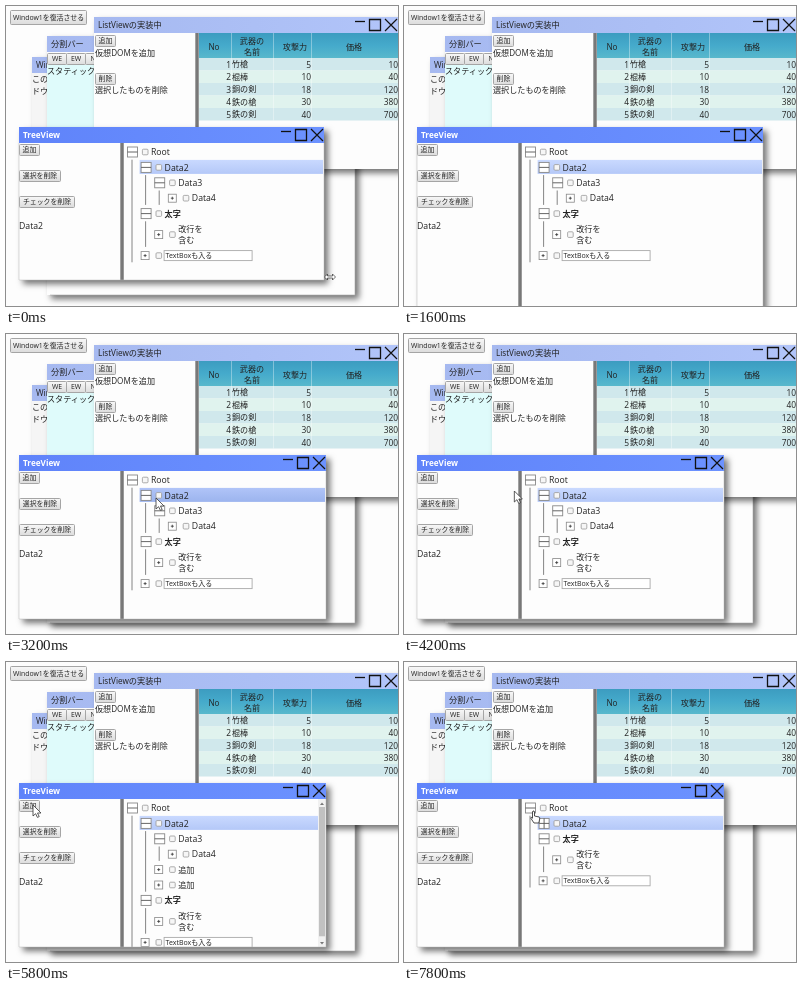
Animation, 392 px wide and 300 px high, one loop 8000 ms. Source, as an HTML page:

```html
<!DOCTYPE html>
<html lang="ja">
<head>
<meta charset="utf-8">
<style>
html, body { margin: 0; width: 100%; height: 100%; overflow: hidden; background: #fdfdfd; }
svg { display: block; width: 392px; height: 300px; }
text { font-family: "Open Sans", "Noto Sans CJK JP", "Noto Sans CJK", sans-serif; fill: #222; }
.win { filter: drop-shadow(4px 4px 3px rgba(0, 0, 0, .55)); }
</style>
</head>
<body>
<svg id="stage" viewBox="0 0 392 300" xmlns="http://www.w3.org/2000/svg">
  <defs>
    <linearGradient id="btn" x2="0" y2="1"><stop stop-color="#f8f8f8"/><stop offset="1" stop-color="#dcdcdc"/></linearGradient>
    <linearGradient id="active"><stop stop-color="#5f83fa"/><stop offset="1" stop-color="#6c92ff"/></linearGradient>
    <linearGradient id="idle"><stop stop-color="#a6b9f0"/><stop offset="1" stop-color="#b2c5fa"/></linearGradient>
    <linearGradient id="head" x2="0" y2="1"><stop stop-color="#3c9cc0"/><stop offset=".5" stop-color="#45aacb"/><stop offset="1" stop-color="#58b8cc"/></linearGradient>
    <linearGradient id="split"><stop stop-color="#b5b5b5"/><stop offset=".5" stop-color="#666"/><stop offset="1" stop-color="#aaa"/></linearGradient>
    <linearGradient id="sel" x2="0" y2="1"><stop stop-color="#c9d9ff"/><stop offset="1" stop-color="#b4c8f8"/></linearGradient>
    <linearGradient id="hover" x2="0" y2="1"><stop stop-color="#b0c4f8"/><stop offset="1" stop-color="#9cb4ee"/></linearGradient>
    <clipPath id="clip"><rect id="clipBox" x="13" y="121"/></clipPath>
  </defs>
  <g id="back"></g>
  <g id="front"></g>
  <g id="pointer"></g>
</svg>
<script>
const $ = id => document.getElementById(id);
const LOOP = 8000, STEP = 200, ROW = 15.4;
const LEFT = 13, TOP = 121;

const rect = (x, y, w, h, fill, more = '') =>
  `<rect x="${x}" y="${y}" width="${w}" height="${h}" fill="${fill}" ${more}/>`;
const path = (d, stroke = '#555', width = 1, fill = 'none') =>
  `<path d="${d}" stroke="${stroke}" stroke-width="${width}" fill="${fill}"/>`;
// y is the middle of the line
const text = (x, y, s, size = 8.1, more = '') =>
  `<text x="${x}" y="${y + size * .36}" font-size="${size}" ${more}>${s}</text>`;
const end = 'text-anchor="end"', mid = 'text-anchor="middle"';
const button = (x, y, w, s, h = 12) =>
  rect(x + .5, y + .5, w - 1, h - 1, 'url(#btn)', 'stroke="#a5a5a5" rx="1"') +
  text(x + w / 2, y + h / 2, s, 6.9, mid);

function frame(x, y, w, h, title, on) {
  return rect(x, y, w, h, '#fdfdfd', 'class="win"') +
    rect(x, y, w, 16, on ? 'url(#active)' : 'url(#idle)') +
    text(x + 4, y + 8.5, title, 8.2, on ? 'style="fill:#fff" font-weight="700"' : '');
}

const titleIcons = (r, y) =>
  path(`M${r - 43} ${y + 4.5}h10`, '#111', 1.3) +
  path(`M${r - 28.5} ${y + 2.5}h11v11h-11z`, '#111', 1.3) +
  path(`M${r - 13} ${y + 2}l12 12m0-12l-12 12`, '#111', 1.2);

function listView() {
  let s = frame(88, 11, 320, 152, 'ListViewの実装中') + titleIcons(392, 11);
  s += button(89, 29, 21, '追加') + text(89, 47, '仮想DOMを追加') +
    button(89, 67, 21, '削除') + text(89, 84, '選択したものを削除');
  s += rect(189, 27, 4, 136, 'url(#split)') + rect(193, 27, 200, 25, 'url(#head)');
  s += text(208, 41, 'No', 8.1, mid) + text(246, 35, '武器の', 8.1, mid) + text(246, 46, '名前', 8.1, mid) +
    text(289, 41, '攻撃力', 8.1, mid) + text(348, 41, '価格', 8.1, mid);
  const items = [['竹槍', 5, 10], ['棍棒', 10, 40], ['銅の剣', 18, 120], ['鉄の槍', 30, 380], ['鉄の剣', 40, 700]];
  items.forEach(([name, power, price], i) => {
    const y = 52 + i * 12.5, c = y + 6.5;
    s += rect(193, y, 200, 12.5, i % 2 ? '#e0f3ee' : '#d0e8ec') +
      text(225, c, i + 1, 8.4, end) + text(226, c, name) +
      text(305, c, power, 8.4, end) + text(392, c, price, 8.4, end);
  });
  for (const x of [225.5, 267.5, 305.5]) s += path(`M${x} 27V114.5`, 'rgba(255,255,255,.5)', .7);
  return s;
}

$('back').innerHTML =
  button(4, 4, 77, 'Window1を復活させる', 15) +
  frame(26, 51, 200, 150, 'Window1') + rect(26, 67, 20, 134, '#f5f5f5') +
  text(26, 73, 'このウィン') + text(26, 85, 'ドウは') +
  frame(41, 30, 308, 259, '分割バー') +
  button(41, 47, 20, 'WE') + button(60, 47, 20, 'EW') + button(79, 47, 20, 'NS') +
  rect(41, 59, 60, 205, '#dffbfb') + text(41, 65.5, 'スタティック') +
  path('M349 163V289H44', '#aaa', .6) + listView();

function at(keys, t) {
  let i = 0;
  while (i < keys.length - 1 && keys[i + 1][0] <= t) i++;
  const a = keys[i], b = keys[i + 1] || a;
  const k = b === a ? 0 : (t - a[0]) / (b[0] - a[0]);
  return [1, 2].map(j => a[j] + (b[j] - a[j]) * k);
}

// [time, right, bottom]
const sizes = [[0, 318, 274], [1000, 359, 274], [1200, 359, 274], [1400, 359, 288], [1600, 359, 308],
  [1800, 355, 307], [2400, 320, 285]];
// [time, x, y]
const moves = [[2600, 324, 290], [3200, 150, 164], [3800, 152, 164], [5000, 27, 143], [6000, 27, 143],
  [6200, 40, 146], [6600, 148, 162], [6800, 140, 159], [7400, 140, 159], [7800, 127, 149]];

const leaf = (label, more) => ({ label, ...more });
function model(t) {
  const added = t < 5200 ? 0 : t < 5600 ? 1 : t < 6000 ? 2 : 3;
  const data3 = { label: 'Data3', kids: [leaf('Data4')] };
  return { label: 'Root', kids: [
    { label: 'Data2', selected: true, closed: t >= 7000,
      kids: [data3, ...Array.from({ length: added }, () => leaf('追加'))] },
    { label: '太字', bold: true, kids: [leaf('改行を', { second: '含む' })] },
    leaf('TextBoxも入る', { input: true })
  ] };
}

function nodeIcon(x, y, node) {
  if (!node.kids) {
    return rect(x + .5, y - 4, 8, 8, '#fff', 'stroke="#888" stroke-width=".8"') +
      path(`M${x + 3} ${y}h3m-1.5-1.5v3`, '#333', .8);
  }
  return rect(x + .5, y - 5, 10, 10, '#fff', 'stroke="#888" stroke-width=".9"') +
    path(`M${x + .5} ${y}h10` + (node.closed ? 'm-5-5v10' : ''), '#555', .9);
}

// Draws a node and its open children; returns the markup and the next y
function branch(node, depth, y, right, hover) {
  const x = 121 + depth * 13.6, tall = node.second ? 26.6 : ROW, c = y + tall / 2;
  let s = '';
  if (node.selected) s += rect(x - 1, y + .2, right - x, 14, hover ? 'url(#hover)' : 'url(#sel)');
  s += nodeIcon(x, c, node) +
    rect(x + 15.4, c - 2.8, 5.6, 5.6, '#f6f6f6', 'stroke="#999" stroke-width=".8" rx="1"');
  if (node.input) {
    s += rect(x + 23.5, c - 5, 88, 10, '#fff', 'stroke="#aaa" stroke-width=".9"') + text(x + 25, c, node.label, 7);
  } else if (node.second) {
    s += text(x + 24, c - 5.6, node.label) + text(x + 24, c + 5.6, node.second);
  } else {
    const latin = /^[A-Z]/.test(node.label);
    s += text(x + 24, c, node.label, latin ? 8.7 : 8.1, node.bold ? 'font-weight="700"' : '');
  }
  y += tall;
  if (node.kids && !node.closed) {
    const start = y;
    for (const kid of node.kids) {
      const [part, next] = branch(kid, depth + 1, y, right, hover);
      s += part;
      y = next;
    }
    s += path(`M${x + 5} ${start}V${y - 1}`, '#777', .9);
  }
  return [s, y];
}

function scrollbar(r, b, content) {
  const x = r - 8, h = b - 137, track = h - 16;
  return rect(x, 137, 8, h, '#f1f1f1') +
    rect(x + 1, 145, 6, track * Math.min(1, h / content), '#c1c1c1') +
    path(`M${x + 2} 143l2-2.5l2 2.5z`, 'none', 0, '#777') +
    path(`M${x + 2} ${b - 5}l2 2.5l2-2.5z`, 'none', 0, '#777');
}

const shapes = {
  arrow: path('M0 0V11L2.6 8.7L4.4 12.4L6.2 11.6L4.5 8H8z', '#333', .8, '#fff'),
  hand: path('M2 0Q3.3-.5 3.5 1V5L8 6Q9 6.3 8.7 8L7.8 12H3L0 7.5Q-.6 6.3.8 6.5L1.5 7.2V1z', '#222', .8, '#fff'),
  wide: path('M-5.5 0L-2.5-3V-1H2.5V-3L5.5 0L2.5 3V1H-2.5V3z', '#333', .7, '#fff'),
  corner: path('M-4-4H0L-1.3-2.7L2.7 1.3L4 0V4H0L1.3 2.7L-2.7-1.3L-4 0z', '#333', .7, '#fff')
};

function pointer(t, r, b) {
  if (t < 1400) return [r + 6, b - 3, 'wide'];
  if (t < 2800) return [r + 4, b + 5, 'corner'];
  const [x, y] = at(moves, t);
  return [x, y, t >= 6800 ? 'hand' : 'arrow'];
}

function draw(t) {
  const [r, b] = at(sizes, t), [px, py, shape] = pointer(t, r, b);
  const hover = px > 134 && px < r && py > 154 && py < 169;
  const tree = model(t), first = 138.3;
  let [rows, bottom] = branch(tree, 0, first, r, hover);
  if (bottom > b) rows += scrollbar(r, b, bottom - 137);

  $('clipBox').setAttribute('width', r - LEFT);
  $('clipBox').setAttribute('height', b - TOP);
  $('front').innerHTML = frame(LEFT, TOP, r - LEFT, b - TOP, 'TreeView', true) +
    titleIcons(r, TOP) +
    `<g clip-path="url(#clip)">` +
    button(13, 138, 21, '追加') + button(13, 164, 42, '選択を削除') + button(13, 190, 56, 'チェックを削除') +
    text(13, 220, 'Data2', 8.7) +
    rect(114, 137, 4, b - 137, 'url(#split)') + rows + '</g>' +
    path(`M${LEFT} ${TOP + 16}V${b}H${r}V${TOP + 16}`, '#bbb', .5);
  $('pointer').innerHTML = `<g transform="translate(${px} ${py})">${shapes[shape]}</g>`;
}

let last = -1;
const begin = performance.now();
function tick() {
  const t = Math.floor((performance.now() - begin) % LOOP / STEP) * STEP;
  if (t !== last) draw(last = t);
  requestAnimationFrame(tick);
}
tick();
</script>
</body>
</html>
```
